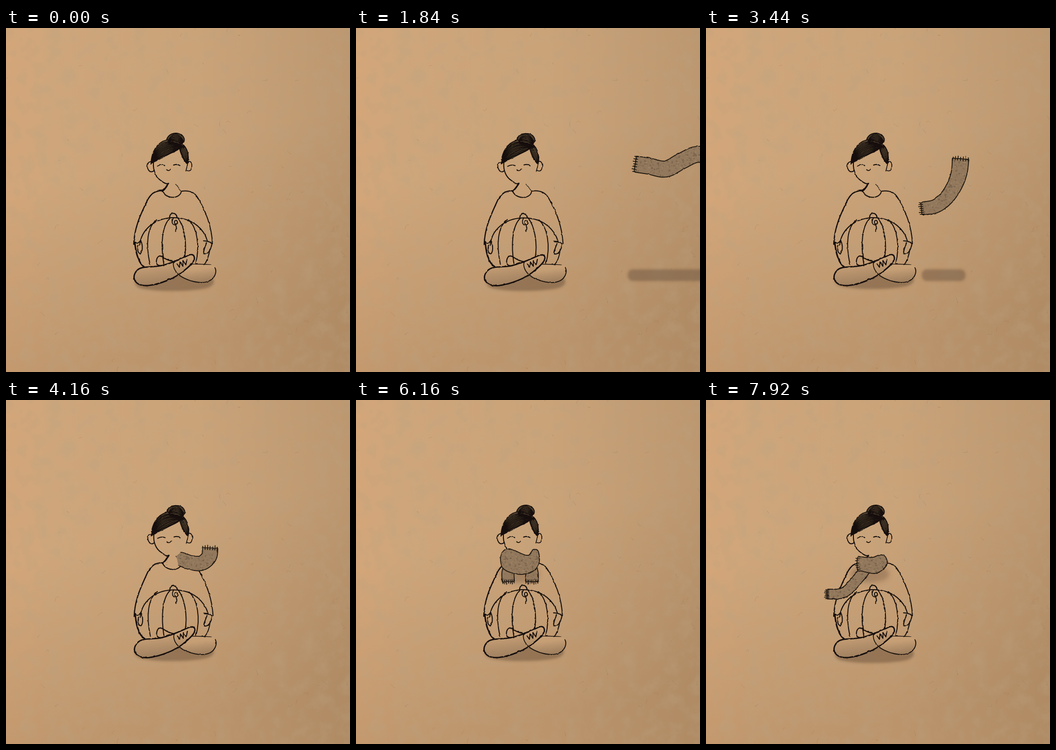
An HTML page that plays this animation: 700x700 px, repeating every 8 s.

```html
<!DOCTYPE html>
<html lang="en">
<head>
<meta charset="utf-8">
<title>Girl, pumpkin and scarf</title>
<style>
html, body { margin: 0; width: 100%; height: 100%; overflow: hidden; background: #c9a077; }
svg { position: absolute; inset: 0; width: 100%; height: 100%; }
#paper { will-change: transform; }
</style>
</head>
<body>
<svg id="paper" viewBox="0 0 700 700">
  <defs>
    <linearGradient id="across"><stop offset="0" stop-color="#d4a679"/><stop offset=".12" stop-color="#cfa67b"/><stop offset=".55" stop-color="#cba379"/><stop offset="1" stop-color="#bc976f"/></linearGradient>
    <linearGradient id="down" x2=".25" y2="1"><stop offset=".45" stop-color="#7d5a38" stop-opacity="0"/><stop offset="1" stop-color="#7d5a38" stop-opacity=".2"/></linearGradient>
    <filter id="grain" x="0" y="0" width="1" height="1">
      <feTurbulence type="fractalNoise" baseFrequency=".035" numOctaves="5" seed="4"/>
      <feColorMatrix values="0 0 0 0 .48  0 0 0 0 .36  0 0 0 0 .22  .75 0 0 0 -.29"/>
    </filter>
  </defs>
  <rect width="700" height="700" fill="url(#across)"/>
  <rect width="700" height="700" fill="url(#down)"/>
  <rect width="700" height="700" filter="url(#grain)"/>
  <path id="fibres" fill="none" stroke="#80603f" stroke-opacity=".2"/>
</svg>
<svg id="stage" viewBox="0 0 700 700" stroke-linecap="round" stroke-linejoin="round">
  <defs>
    <linearGradient id="legFill" x2=".25" y2="1"><stop offset=".35" stop-color="#c69f75"/><stop offset="1" stop-color="#a08060"/></linearGradient>
    <filter id="soft" x="-20%" y="-60%" width="140%" height="220%"><feGaussianBlur stdDeviation="2.5"/></filter>
    <filter id="softer" x="-30%" y="-50%" width="160%" height="200%"><feGaussianBlur stdDeviation="5"/></filter>
    <pattern id="wool" width="64" height="64" patternUnits="userSpaceOnUse"><rect width="64" height="64" fill="#92785c"/></pattern>
    <mask id="behind" maskUnits="userSpaceOnUse" x="0" y="0" width="700" height="700">
      <rect width="700" height="700" fill="#fff"/>
      <path d="M298 270C300 295 308 312 328 317L327 345L352 345L347 317C360 308 370 290 372 265Z"/>
    </mask>
  </defs>
  <g fill="#695039">
    <path id="ground" fill-opacity=".5" filter="url(#soft)" d="M270 508C295 500 390 499 414 506C430 513 424 528 400 531C365 537 300 537 272 529C260 524 260 513 270 508Z"/>
    <rect id="flyShade" height="24" y="491" rx="11" fill-opacity=".46" filter="url(#soft)"/>
    <ellipse id="bodyShade" cx="333" cy="354" rx="40" ry="18" fill-opacity=".36" filter="url(#softer)"/>
  </g>
  <g id="girl" fill="none" stroke="#130e09"></g>
  <g id="scarf" fill="none" stroke="#1a130d">
    <g mask="url(#behind)">
      <path id="band" fill="url(#wool)" stroke-width="3.4" paint-order="stroke"/>
      <path id="fringe" stroke-width="1.6"/>
    </g>
    <path id="wrap" fill="url(#wool)" stroke-width="3.4" paint-order="stroke"/>
    <path id="wrapFringe" stroke-width="1.6" d="M305 322l7 1M304 327l7 0M305 332l7 0M304 337l7-1M306 341l7-1M308 345l6-1"/>
  </g>
</svg>
<script>
const LOOP = 8000;
const $ = id => document.getElementById(id);
const lerp = (a, b, f) => a + (b - a) * f;
const clamp = x => Math.max(0, Math.min(1, x));
const ease = (t, a, b) => { const f = clamp((t - a) / (b - a)); return f * f * (3 - 2 * f); };
const rng = seed => () => (seed = (seed * 16807) % 2147483647) / 2147483647;
const nums = s => s.split(/[ ,]+/).map(Number);

function add(parent, tag, attrs) {
  const el = document.createElementNS('http://www.w3.org/2000/svg', tag);
  for (const k in attrs) el.setAttribute(k, attrs[k]);
  parent.appendChild(el);
  return el;
}

// Paper fibres and wool speckles
const rnd = rng(77);
let fibres = '';
for (let i = 0; i < 70; i++) {
  const r = () => ((rnd() - .5) * 18).toFixed(1);
  fibres += `M${(rnd() * 700).toFixed(0)} ${(rnd() * 700).toFixed(0)}q${r()} ${r()} ${r()} ${r()}`;
}
$('fibres').setAttribute('d', fibres);
for (let i = 0; i < 260; i++) {
  add($('stage').querySelector('pattern'), 'circle', {
    cx: rnd() * 64, cy: rnd() * 64, r: .5 + rnd() * 1.5,
    fill: i % 3 ? '#48392a' : '#b8976f', 'fill-opacity': .12 + rnd() * .2
  });
}

// Girl: [stroke width, path, fill]
const LEG = 'M318 483C300 488 276 483 267 493C254 506 260 526 290 524C315 521 343 509 358 497C370 488 386 475 383 466C382 460 376 460 370 463C355 470 340 478 318 483';
const LINES = [
  [1.6, 'M377 481C392 480 405 481 417 482'],
  [0, 'M352 503C372 516 396 521 410 516C425 511 430 497 425 486L417 482L377 481Z', 'url(#legFill)'],
  [1.8, 'M352 503C372 516 396 521 410 516C425 511 430 497 425 487'],
  [2.4, 'M319 331C301 331 295 338 288 350C275 377 261 405 260 440'],
  [3, 'M262 436C264 455 268 477 281 486'],
  [2, 'M262 436C268 440 270 437 274 432C280 445 277 457 273 459C268 458 267 450 269 442'],
  [2, 'M357 332C371 330 383 333 390 345C406 371 419 405 420 439'],
  [2, 'M402 433C409 434 414 434 419 439C417 452 410 462 403 459C400 455 405 448 408 437'],
  [1.9, 'M415 450C413 462 409 475 403 482'],
  [2, 'M272 442C275 411 301 388 338 386C382 385 404 412 410 434'],
  [1.9, 'M307 390C287 404 284 440 293 481'],
  [2, 'M333 388C318 402 314 440 321 479'],
  [2, 'M350 387C363 402 369 438 363 470'],
  [1.9, 'M371 390C389 405 395 445 386 479'],
  [2.4, 'M333 385C333 375 346 374 348 385'],
  [1.9, 'M341 386C333 399 344 405 349 397C350 389 339 390 344 399C348 405 348 409 345 414'],
  [2.2, 'M318 483C310 485 305 481 306 475C307 464 313 461 320 467C328 472 334 474 340 475'],
  [2.7, LEG, 'url(#legFill)'],
  [1.6, 'M344 473C337 478 341 492 350 500'],
  [2, 'M348 480L353 487L354 476L360 485L360 473L366 482L368 471'],
  [2, 'M300 275C299 290 305 304 316 311C322 316 328 318 331 316'],
  [3.2, 'M330 317C327 322 324 328 318 332'],
  [1.1, 'M345 318C351 322 351 327 356 331'],
  [1.9, 'M318 332C323 342 334 346 345 344C352 342 356 337 357 332'],
  [1.6, 'M371 262C372 270 369 280 366 291'],
  [1.9, 'M300 274C290 267 284 280 290 289C293 294 299 293 301 290'],
  [1.7, 'M369 273C377 268 380 277 377 287C375 292 371 291 368 290'],
  [1.9, 'M308 281C313 278 318 278 323 280'],
  [1.9, 'M341 279C346 277 351 278 354 280'],
  [1.6, 'M327 288C329 291 333 291 335 287'],
  [1.8, 'M329 234C323 225 333 214 346 214C360 214 367 226 360 235C350 241 338 236 329 234Z', '#4b3d2d'],
  [1.8, 'M295 276C296 252 307 233 326 228C345 225 362 234 368 248C372 258 372 267 368 276C361 268 357 257 353 245C340 257 312 259 295 276Z', '#5d4b37']
];

// Strands blended between an outer and an inner quadratic curve
function strands(n, outer, inner) {
  const a = nums(outer), b = nums(inner);
  let d = '';
  for (let i = 0; i < n; i++) {
    const p = a.map((v, k) => lerp(v, b[k], i / (n - 1)).toFixed(1));
    d += `M${p[0]} ${p[1]}Q${p[2]} ${p[3]} ${p[4]} ${p[5]}`;
  }
  return d;
}
LINES.push([1.25, strands(15, '364 242 310 212 296 268', '352 245 335 256 297 275')
  + strands(6, '356 234 374 248 369 275', '353 245 357 264 367 275')
  + strands(10, '330 229 344 202 361 229', '331 235 345 242 359 235')]);

const jitter = (d, amt, dx, dy, r) => {
  let i = 0;
  return d.replace(/[\d.]+/g, n => (+n + (i++ % 2 ? dy : dx) + (r() - .5) * amt).toFixed(1));
};
const POSES = [[0, 0, 0], [1.1, .8, .2], [1.1, .8, 1]].map(([amt, dx, dy], k) => {
  const f = add($('stage').querySelector('defs'), 'filter', { id: 'rough' + k, filterUnits: 'userSpaceOnUse', x: 200, y: 190, width: 500, height: 360 });
  add(f, 'feTurbulence', { type: 'fractalNoise', baseFrequency: .12, numOctaves: 2, seed: k + 3 });
  add(f, 'feDisplacementMap', { in: 'SourceGraphic', scale: 2.6, xChannelSelector: 'R', yChannelSelector: 'G' });
  const g = add($('girl'), 'g', { filter: `url(#rough${k})` }), r = rng(31 + k);
  for (const [w, d, fill] of LINES) {
    add(g, 'path', { d: jitter(d, amt, dx, dy, r), 'stroke-width': w, stroke: w ? '#130e09' : 'none', fill: fill || 'none' });
  }
  return g;
});
const BOIL = [0, 0, 1, 1, 2, 2, 2];

// Scarf keys: time, six centre points from left end to right end, width at each end
const FLIGHT = [
  '1840 569 277 596 281 630 287 662 271 695 257 735 264 31 31',
  '2240 470 292 497 301 525 289 553 278 580 288 608 294 31 31',
  '2640 442 312 466 296 492 300 518 308 545 296 568 284 31 31',
  '3440 439 367 466 363 488 347 505 322 515 295 518 267 24 32',
  '3840 398 336 426 347 454 340 476 320 490 295 498 268 25 31',
  '4120 338 322 362 322 386 333 408 333 424 316 428 294 25 30',
  '4360 313 367 314 338 328 315 353 321 365 333 357 350 25 31',
  '5700 310 369 310 348 322 328 345 328 357 348 358 369 23 24',
  '7920 247 395 282 391 314 358 328 340 342 335 348 335 18 22'
].map(nums);
const HOLDS = { 4360: 5120, 5700: 7520 };
const entry = FLIGHT[0].map((v, i) => i === 0 ? 1300 : i % 2 && i < 13 ? v + 220 : v);
const KEYS = [entry, ...FLIGHT.flatMap(k => HOLDS[k[0]] ? [k, [HOLDS[k[0]], ...k.slice(1)]] : [k])];

// Monotone cubic interpolation through the keys
function pose(t) {
  const last = KEYS.length - 1;
  if (t <= KEYS[0][0]) return KEYS[0].slice(1);
  if (t >= KEYS[last][0]) return KEYS[last].slice(1);
  const i = KEYS.findIndex(k => k[0] > t) - 1, a = KEYS[i], b = KEYS[i + 1];
  const h = b[0] - a[0], f = (t - a[0]) / h;
  const slope = (j, c) => (KEYS[j + 1][c] - KEYS[j][c]) / (KEYS[j + 1][0] - KEYS[j][0]);
  const tangent = (j, c) => {
    if (j === 0 || j === last) return 0;
    const p = slope(j - 1, c), q = slope(j, c);
    return p * q > 0 ? 2 * p * q / (p + q) : 0;
  };
  const s = f * f * (3 - 2 * f), m0 = f * (1 - f) * (1 - f), m1 = f * f * (f - 1);
  return a.slice(1).map((v, n) => lerp(v, b[n + 1], s) + h * (m0 * tangent(i, n + 1) + m1 * tangent(i + 1, n + 1)));
}

const spline = (a, b, c, d, f) => .5 * (2 * b + (c - a) * f + (2 * a - 5 * b + 4 * c - d) * f * f + (3 * b - a - 3 * c + d) * f * f * f);
const fix = p => p[0].toFixed(1) + ' ' + p[1].toFixed(1);

function ribbon(t) {
  const v = pose(t), pts = [];
  const flutter = 6 * Math.sin((t - 1840) * Math.PI / 400) * (1 - ease(t, 3400, 3900));
  for (let i = 0; i < 6; i++) pts.push([v[2 * i], v[2 * i + 1] + flutter * Math.sin(i * 1.3)]);
  const near = i => pts[Math.max(0, Math.min(5, i))];
  const mid = [], N = 30;
  for (let n = 0; n <= N; n++) {
    const u = n / N * 5, i = Math.min(4, Math.floor(u));
    mid.push([0, 1].map(c => spline(near(i - 1)[c], near(i)[c], near(i + 1)[c], near(i + 2)[c], u - i)));
  }
  const dir = n => {
    const a = mid[Math.max(0, n - 1)], b = mid[Math.min(N, n + 1)];
    const x = b[0] - a[0], y = b[1] - a[1], l = Math.hypot(x, y) || 1;
    return [x / l, y / l];
  };
  const side = (n, k) => {
    const [x, y] = dir(n), w = lerp(v[12], v[13], n / N) / 2 * k;
    return [mid[n][0] - y * w, mid[n][1] + x * w];
  };
  const up = mid.map((_, n) => side(n, 1)), low = mid.map((_, n) => side(n, -1)).reverse();
  let fringe = '';
  for (const [n, s] of [[0, -1], [N, 1]]) {
    const [x, y] = dir(n);
    for (let k = 0; k < 7; k++) {
      const p = side(n, k / 3 - 1), len = 4 + k % 3;
      fringe += `M${fix([p[0] - x * s * 3, p[1] - y * s * 3])}L${fix([p[0] + x * s * len, p[1] + y * s * len])}`;
    }
  }
  const xs = mid.map(p => p[0]);
  return { d: 'M' + [...up, ...low].map(fix).join('L') + 'Z', fringe, left: Math.min(...xs), right: Math.max(...xs) };
}

const WRAPPED = nums('297 313 306 304 320 306 348 317 361 306 370 308 372 330 362 346 338 354 314 350 299 341 295 326');
const LOOSE = nums('309 321 315 320 325 321 340 321 354 316 364 319 368 332 360 344 344 352 328 350 316 347 309 345');

function wrapPath(grow, loose) {
  const p = [];
  for (let i = 0; i < 12; i++) {
    p.push([lerp(366, lerp(WRAPPED[2 * i], LOOSE[2 * i], loose), grow),
            lerp(326, lerp(WRAPPED[2 * i + 1], LOOSE[2 * i + 1], loose), .4 + .6 * grow)]);
  }
  const q = i => p[(i + 12) % 12];
  let d = 'M' + fix(p[0]);
  for (let i = 0; i < 12; i++) {
    const a = q(i), b = q(i + 1);
    const c1 = [0, 1].map(c => a[c] + (b[c] - q(i - 1)[c]) / 6);
    const c2 = [0, 1].map(c => b[c] - (q(i + 2)[c] - a[c]) / 6);
    d += `C${fix(c1)} ${fix(c2)} ${fix(b)}`;
  }
  return d + 'Z';
}

function draw(time) {
  const t = Math.floor(time % LOOP / 40) * 40;
  const boil = BOIL[Math.floor(t / 80) % BOIL.length];
  POSES.forEach((g, k) => g.setAttribute('display', k === boil ? 'inline' : 'none'));

  const beat = t % 680, raised = beat > 20 && beat < 160;
  $('ground').setAttribute('transform', raised ? 'translate(0 -4)' : boil === 1 ? 'translate(3 0)' : '');

  const r = ribbon(t);
  $('scarf').setAttribute('display', t > 1300 ? 'inline' : 'none');
  $('scarf').setAttribute('filter', `url(#rough${boil})`);
  $('band').setAttribute('d', r.d);
  $('fringe').setAttribute('d', r.fringe);

  const pad = lerp(16, 0, ease(t, 1840, 3200));
  $('flyShade').setAttribute('x', r.left - pad);
  $('flyShade').setAttribute('width', r.right - r.left + pad + 10);
  $('flyShade').setAttribute('opacity', t > 1300 ? 1 - ease(t, 3700, 4200) : 0);
  $('bodyShade').setAttribute('opacity', ease(t, 4150, 4400));

  const grow = ease(t, 5120, 5700), loose = ease(t, 7520, 7920);
  $('wrap').setAttribute('display', grow > 0 ? 'inline' : 'none');
  $('wrap').setAttribute('d', wrapPath(grow, loose));
  $('wrapFringe').setAttribute('opacity', loose > .6 ? 1 : 0);
}

const start = performance.now();
function tick() {
  draw(performance.now() - start);
  requestAnimationFrame(tick);
}
tick();
</script>
</body>
</html>
```
